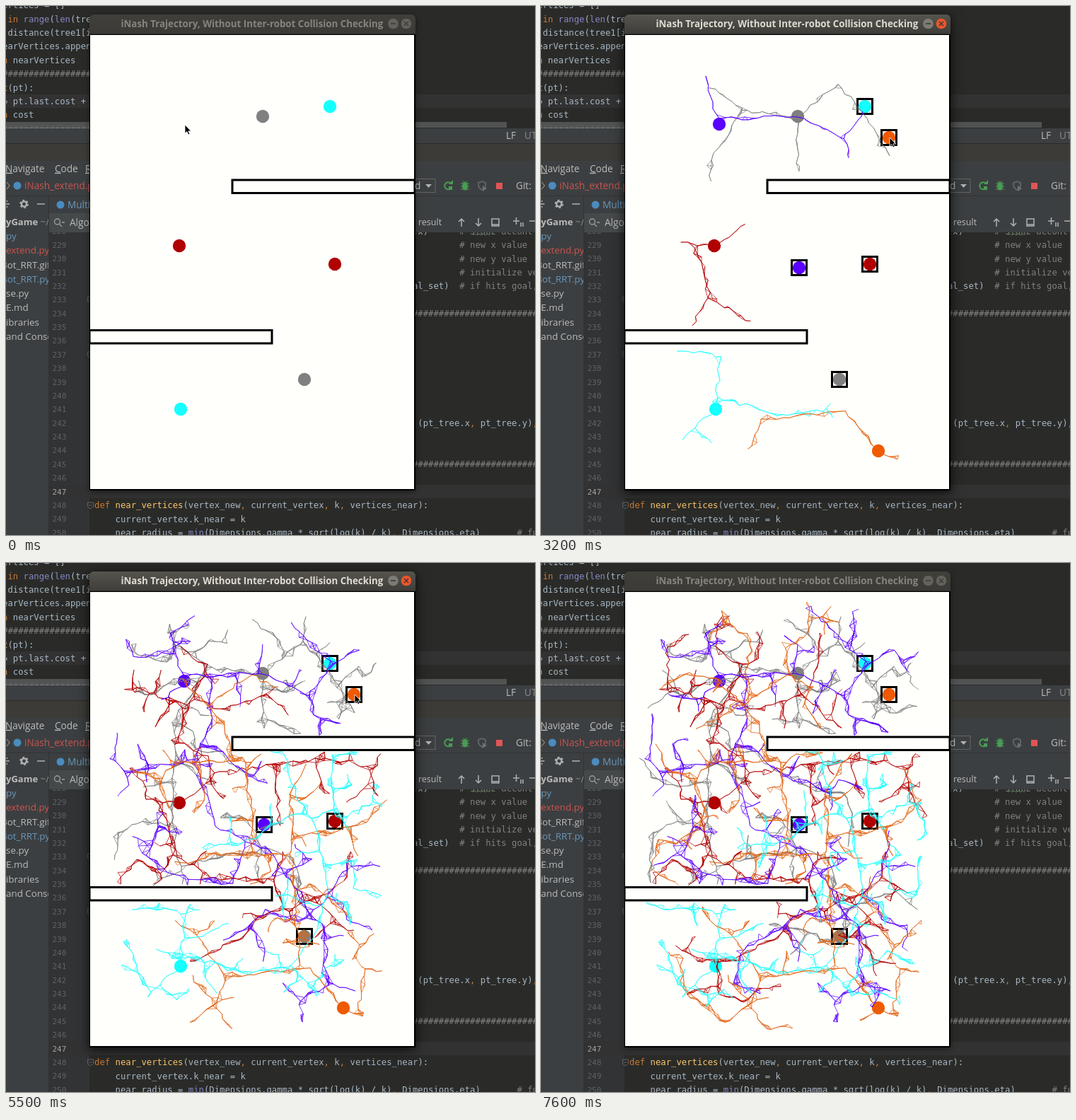
Recreate the animation shown at these times as an HTML page with a canvas. Size 748 by 748 pixels, loop 7700 ms.

```html
<!DOCTYPE html>
<html lang="en">
<head>
<meta charset="utf-8">
<title>Trajectory planner</title>
<style>
html, body { margin: 0; width: 100%; height: 100%; overflow: hidden; background: #2b2b2b; }
#stage { position: relative; width: 748px; height: 748px; overflow: hidden; }
#stage > * { position: absolute; left: 0; top: 0; }
svg text { white-space: pre; }
#stage > .shadow { left: 118px; top: 12px; width: 461px; height: 673px; border-radius: 7px 7px 0 0; }
#idle { box-shadow: 0 2px 9px rgba(0,0,0,.45); }
#focus { box-shadow: 0 4px 20px rgba(0,0,0,.5); }
</style>
</head>
<body>
<div id="stage">
  <svg id="desk" width="748" height="748"></svg>
  <div id="idle" class="shadow"></div>
  <div id="focus" class="shadow"></div>
  <svg id="bar" width="748" height="748"></svg>
  <canvas id="view" width="748" height="748"></canvas>
  <svg id="mouse" width="748" height="748">
    <path id="arrow" d="M0 0V12L2.8 9.6L4.8 14L6.8 13.1L4.9 8.9H8.6Z" stroke="#fff" stroke-width=".8"/>
    <path id="beam" d="M-3-6Q0-6 0-4Q0-6 3-6M0-4V5M-3 7Q0 7 0 5Q0 7 3 7" fill="none" stroke="#ddd" stroke-width="1.2"/>
  </svg>
</div>
<script>
const LOOP = 7700, STEP = 100, LAUNCH = 2800;
const $ = id => document.getElementById(id);
const SANS = "'Open Sans','Noto Sans',sans-serif", MONO = "'DejaVu Sans Mono',monospace";

// ---- desktop behind the window ----
const rect = (x, y, w, h, fill, more = '') =>
  `<rect x="${x}" y="${y}" width="${w}" height="${h}" fill="${fill}" ${more}/>`;
const text = (x, mid, s, fill = '#bbbbbb', size = 13.6, font = SANS, more = '') =>
  `<text x="${x}" y="${mid + size * .35}" fill="${fill}" font-size="${size}" font-family="${font}" ${more}>${s}</text>`;
const line = (d, stroke = '#afb1b3', w = 1.5) =>
  `<path d="${d}" fill="none" stroke="${stroke}" stroke-width="${w}"/>`;
const dot = (x, y, r, fill) => `<circle cx="${x}" cy="${y}" r="${r}" fill="${fill}"/>`;

const SYNTAX = [
  [/^#/, '#808080'],
  [/^(def|in|n|,)$/, '#cc7832'],
  [/^(near_vertices|t)$/, '#ffc66d'],
  [/^(range|len|min)$/, '#8888c6']
];
function code(x, mid, s) {
  const paint = tok => {
    const hit = SYNTAX.find(([re]) => re.test(tok));
    return hit ? `<tspan fill="${hit[1]}">${tok}</tspan>` : tok;
  };
  return text(x, mid, s.replace(/#.*|\w+|,/g, paint), '#a9b7c6', 12.25, MONO);
}

const HASHES = '#'.repeat(30);
const at = (col, s) => ' '.repeat(col) + s;
const UPPER = ['ertices = []', ' in range(len(tree1)):', '(distance(tree1[i]', 'earVertices.append', 'n nearVertices',
  HASHES, 't(pt):', '= pt.last.cost + ', 'n cost', HASHES];
const LOWER = {
  228: at(61, '.x)      # stanz accont'), 229: at(70, '# new x value'), 230: at(70, '# new y value'),
  231: at(70, '# initialize vertex'), 232: at(61, 'al_set)  # if hits goal, stop'),
  234: at(61, HASHES), 242: at(62, '(pt_tree.x, pt_tree.y),'), 245: at(61, HASHES),
  248: 'def near_vertices(vertex_new, current_vertex, k, vertices_near):',
  249: at(4, 'current_vertex.k_near = k'),
  250: at(4, 'near_radius = min(Dimensions.gamma * sqrt(log(k) / k), Dimensions.eta)       # full')
};

function editors() {
  let s = rect(0, 0, 748, 748, '#2a2b28') + rect(0, 125, 748, 19, '#323232') +
    rect(60, 320, 58, 428, '#313335') + rect(60, 677, 688, 19, '#323232');
  UPPER.forEach((row, i) => s += code(-5, -1 + i * 19.37, row));
  s += rect(0, 164, 708, 8, '#595b5b', 'opacity=".85"');
  for (let n = 228; n <= 250; n++) {
    const y = 338 + (n - 229) * 19.37;
    s += text(65.5, y, n, n === 247 ? '#a4a3a3' : '#606366', 11, MONO) + code(125, y, LOWER[n] ?? '');
    if (n % 4 === 1 && n > 229 && n < 240 || n === 248)
      s += line(`M115.5 ${y - 4}h8v6l-4 3l-4-3zM117.5 ${y}h4`, '#606366', 1);
  }
  return s + line('M660 324' + 'l3-2l3 2'.repeat(4), '#5a7a55', 1);
}

function chrome() {
  const panel = '#3c3f41', green = '#499c54';
  const menu = (x, first, rest) => text(x, 230, `<tspan text-decoration="underline">${first}</tspan>${rest}`);
  return rect(0, 173, 748, 21, panel) + text(707, 183, 'LF') + text(733, 183, 'UTF-8', '#8a8c8d') +
    rect(0, 194, 748, 25, '#3c3b37') + rect(0, 194, 748, 1, '#2c2b28') +
    rect(0, 219, 748, 101, panel) + rect(0, 268, 748, 1, '#323232') +
    menu(-1, 'N', 'avigate') + menu(69, 'C', 'ode') + menu(112, 'R', 'efactor') +
    line('M1 249L5 254L1 259', '#8a8c8d', 1.2) + dot(16, 254, 5.5, '#4b8bbe') +
    text(26, 254, 'iNash_extend.py', '#c75450') +
    rect(540, 244.5, 67, 19, panel, 'stroke="#646464"') + text(578, 254, 'd') +
    '<path d="M593 252h9l-4.5 5z" fill="#afb1b3"/>' +
    line('M629 251A5 5 0 1 0 630 256', green, 2) + `<path d="M626 252h6v-6z" fill="${green}"/>` +
    rect(626, 255, 5, 5, green) + `<ellipse cx="649" cy="255" rx="4" ry="5.5" fill="${green}"/>` +
    line('M643 251h12M643 255h12M643 259h12M646 248l6 3M652 248l-6 3', green, 1.2) +
    line('M668 250l5-2l5 2v4q-1 4-5 6q-4-2-5-6z', '#5f6264', 2) +
    '<path d="M674 254v8l6-4z" fill="#6e7173"/>' + rect(693, 250, 9, 9, '#e05555') + text(721, 254, 'Git:') +
    line('M0 280h5M1.5 275v2M1.5 283v2', '#afb1b3', 1.3) +
    '<circle cx="25.5" cy="280" r="3.6" fill="none" stroke="#afb1b3" stroke-width="2.4"/>' +
    '<circle cx="25.5" cy="280" r="5.4" fill="none" stroke="#afb1b3" stroke-width="1.8" stroke-dasharray="2.8 2.85"/>' +
    line('M44 280h11') + dot(77, 281, 5.5, '#4b8bbe') + text(87, 281, 'Multi', '#6897bb') +
    rect(61, 293, 57, 27, '#45494a') +
    '<circle cx="72.5" cy="305" r="4" fill="none" stroke="#9a9da0" stroke-width="1.4"/>' +
    line('M75 308l4 4M79 306h4', '#9a9da0', 1.3) + text(90, 306, 'Algorithm') + text(583, 306, 'result', '#bbbbbb', 12.5) +
    line('M644 312v-11M640 305l4-4l4 4M668 300v11M664 307l4 4l4-4M687 301h10v10h-10zM687 309h10') +
    line('M717 304h9M721.5 299v10M728 306v6M731 306v6M740 304h9');
}

function project() {
  const rows = [['<tspan font-weight="bold" font-size="13">yGame</tspan> <tspan fill="#8a8c8d">~/P</tspan>'],
    ['py', '#6897bb'], ['extend.py', '#d0544f'], ['Bot_RRT.gif'], ['Bot_RRT.py', '#6897bb'],
    ['se.py'], ['E.md'], ['Libraries'], ['and Consoles']];
  const list = rows.map(([t, c], i) => text(/^[BL]/.test(t) ? -7 : 0, 305 + i * 20.3, t, c, 13.4)).join('');
  return rect(0, 293, 60, 455, '#3c3f41') + rect(60, 269, 1, 479, '#323232') +
    `<clipPath id="side">${rect(0, 290, 60, 458, '#000')}</clipPath><g clip-path="url(#side)">${list}</g>`;
}

function titleBar(id, top, low, ink, button, close, mark) {
  return `<linearGradient id="${id}Fill" x2="0" y2="1"><stop stop-color="${top}"/><stop offset="1" stop-color="${low}"/></linearGradient>
  <g id="${id}"><path d="M118 41V19q0-7 7-7h447q7 0 7 7v22z" fill="url(#${id}Fill)"/>` +
    text(162.5, 25, 'iNash Trajectory, Without Inter-robot Collision Checking', ink, 13.3, SANS, 'font-weight="bold"') +
    dot(547.5, 25, 7.3, button) + dot(566, 25, 7.3, close) +
    line('M544 25h7M563 22l6 6M569 22l-6 6', mark, 1.3) + '</g>';
}
$('desk').innerHTML = editors() + chrome() + project();
$('bar').innerHTML = titleBar('dull', '#403f3a', '#3b3a36', '#87847d', '#64625c', '#64625c', '#3b3a36') +
  titleBar('lit', '#56544d', '#3d3c38', '#dfdbd2', '#7d7b74', '#e9562b', '#3a3531');

// ---- random trees: a colour, the root, then the first places it reaches ----
const TREES = [
  ['#808080', '363,156 364,241 408,240 285,148 236,112 418,112 455,152 248,205 238,250 234,350 246,430 495,215'],
  ['#b00000', '245,339 290,308 285,272 455,276 233,248 258,195 285,145 210,188 200,335 236,400 215,451 300,449 380,448 403,505'],
  ['#5a00ff', '252,167 232,97 180,133 363,156 425,185 464,141 435,212 290,225 268,275 183,293 295,370 375,408 437,505 318,452 230,440'],
  ['#e06414', '477,629 508,642 507,578 430,572 310,585 295,625 410,495 402,390 300,412 350,358 470,380 402,335 335,273 232,284 305,220 255,170 345,160'],
  ['#20ffff', '247,570 253,500 190,486 200,610 243,617 345,580 400,572 440,610 432,530 455,465 487,480 440,380 395,295']
];
const WALLS = [[320, 246, 258, 18.5], [118, 458.5, 258, 18.5]];
const PACE = 8, REACH = 13.5, SHOOTS = 95;

function rng(seed) {
  return () => {
    seed = seed + 0x6D2B79F5 | 0;
    let v = Math.imul(seed ^ seed >>> 15, seed | 1);
    v ^= v + Math.imul(v ^ v >>> 7, v | 61);
    return ((v ^ v >>> 14) >>> 0) / 4294967296;
  };
}
const gap = (a, b) => Math.hypot(a.x - b.x, a.y - b.y);
const blocked = p => WALLS.some(([x, y, w, h]) => p.x > x - 2 && p.x < x + w + 2 && p.y > y - 2 && p.y < y + h + 2);
const inArea = p => ((p.x - 346) / 206) ** 4 + ((p.y - 358) / 302) ** 4 < 1;

function grow([color, places], seed) {
  const rand = rng(seed * 97 + 5), wobble = r => (rand() * 2 - 1) * r;
  const [root, ...keys] = places.split(' ').map(s => {
    const [x, y] = s.split(',').map(Number);
    return { x, y, born: LAUNCH };
  });
  const nodes = [root], edges = [];
  const nearest = p => nodes.reduce((a, b) => gap(b, p) < gap(a, p) ? b : a);

  // step from the closest node towards a goal, stopping at walls
  function extend(goal, length, birth) {
    const from = nearest(goal), d = gap(from, goal), n = Math.round(Math.min(d, length) / PACE);
    let prev = from;
    for (let i = 1; i <= n; i++) {
      const u = i * PACE / d, x = from.x + (goal.x - from.x) * u, y = from.y + (goal.y - from.y) * u;
      const node = { x: x + wobble(2.8), y: y + wobble(2.8) };
      if (blocked(node)) return;
      node.born = Math.max(prev.born, birth(node, i));
      edges.push([prev, node, node.born]);
      nodes.push(prev = node);
      const side = { x: x + wobble(6.5), y: y + wobble(6.5), born: node.born + rand() * rand() * 1500 };
      if (rand() < .55 && !blocked(side)) nodes.push(side);
    }
  }

  const far = Math.max(...keys.map(k => gap(k, root)));
  for (const key of keys) extend(key, Infinity, p => LAUNCH + 750 * gap(p, root) / far);
  for (let i = 0; i < SHOOTS;) {
    const goal = { x: 140 + rand() * 412, y: 56 + rand() * 604 }, d = gap(nearest(goal), goal);
    if (!inArea(goal) || d < 15 || d > 70) continue;
    const start = 3400 + 3850 * (i++ / SHOOTS) ** 1.3;
    extend(goal, 36, (p, k) => start + k * 40);
  }
  nodes.forEach((a, i) => {
    for (let j = 0; j < i; j++)
      if (gap(a, nodes[j]) < REACH) edges.push([a, nodes[j], Math.max(a.born, nodes[j].born)]);
  });
  return { color, edges };
}
const trees = TREES.map(grow);

// ---- robots: colour, x, y, time shown, goal? ----
const ROBOTS = [
  ['#808080', 363, 156, 0], ['#808080', 422, 528, 0, true], ['#14ffff', 458, 142, 0, true], ['#14ffff', 247, 570, 0],
  ['#b00000', 245, 339, 0], ['#b00000', 465, 365, 0, true], ['#5a00ff', 252, 167, 200], ['#5a00ff', 365, 370, 1300, true],
  ['#f05a00', 477, 629, 2000], ['#f05a00', 492, 186, LAUNCH, true]
];
const g = $('view').getContext('2d');

function drawView(t) {
  g.clearRect(0, 0, 748, 748);
  g.save();
  g.beginPath();
  g.rect(118, 39.5, 461, 645.5);
  g.clip();
  g.fillStyle = '#000';
  g.fillRect(118, 39.5, 461, 645.5);
  g.fillStyle = '#fffffc';
  g.fillRect(119, 41, 458, 642);
  g.strokeStyle = '#000';
  g.lineWidth = 3;
  for (const [color, x, y, since, goal] of ROBOTS) {
    if (t < since) continue;
    if (goal && t >= LAUNCH) g.strokeRect(x - 10.5, y - 10.5, 21, 21);
    g.fillStyle = color;
    g.beginPath();
    g.arc(x, y, 9.2, 0, 7);
    g.fill();
  }
  if (t >= 3300) {
    g.fillStyle = '#b8703c';
    g.fill(new Path2D('M413 525L421 518L430 527L421 531Z'));
  }
  g.lineWidth = .75;
  for (const { color, edges } of trees) {
    g.strokeStyle = color;
    g.beginPath();
    for (const [a, b, born] of edges)
      if (born <= t) { g.moveTo(a.x, a.y); g.lineTo(b.x, b.y); }
    g.stroke();
  }
  g.fillStyle = '#fffffc';
  g.strokeStyle = '#000';
  g.lineWidth = 3;
  for (const wall of WALLS) {
    g.fillRect(...wall);
    g.strokeRect(...wall);
  }
  g.restore();
}

// ---- pointer moves: start, end, x, y ----
const MOVES = [
  [400, 1100, 365, 371], [1200, 1400, 442, 469], [1500, 1800, 477, 629], [1900, 2200, 447, 420],
  [2200, 2700, 493, 186], [6100, 6700, 89, 31], [6700, 6900, 66, 4]
];
function drawMouse(t) {
  let x = 253, y = 168;
  for (const [from, to, tx, ty] of MOVES) {
    const u = Math.max(0, Math.min(1, (t - from) / (to - from))), ease = 1 - (1 - u) ** 2;
    x += (tx - x) * ease;
    y += (ty - y) * ease;
  }
  const shape = t > 6800 ? '' : x < 118 ? 'beam' : 'arrow';
  for (const id of ['arrow', 'beam']) {
    $(id).setAttribute('transform', `translate(${x} ${y})`);
    $(id).style.display = id === shape ? '' : 'none';
  }
}

let shown = -1;
const start = performance.now();
function tick() {
  const t = Math.floor((performance.now() - start) % LOOP / STEP) * STEP;
  if (t !== shown) {
    shown = t;
    const lit = Math.max(0, Math.min(1, (t - 100) / 200, (7600 - t) / 300));
    $('lit').style.opacity = $('focus').style.opacity = lit;
    drawView(t);
    drawMouse(t);
  }
  requestAnimationFrame(tick);
}
tick();
</script>
</body>
</html>
```
